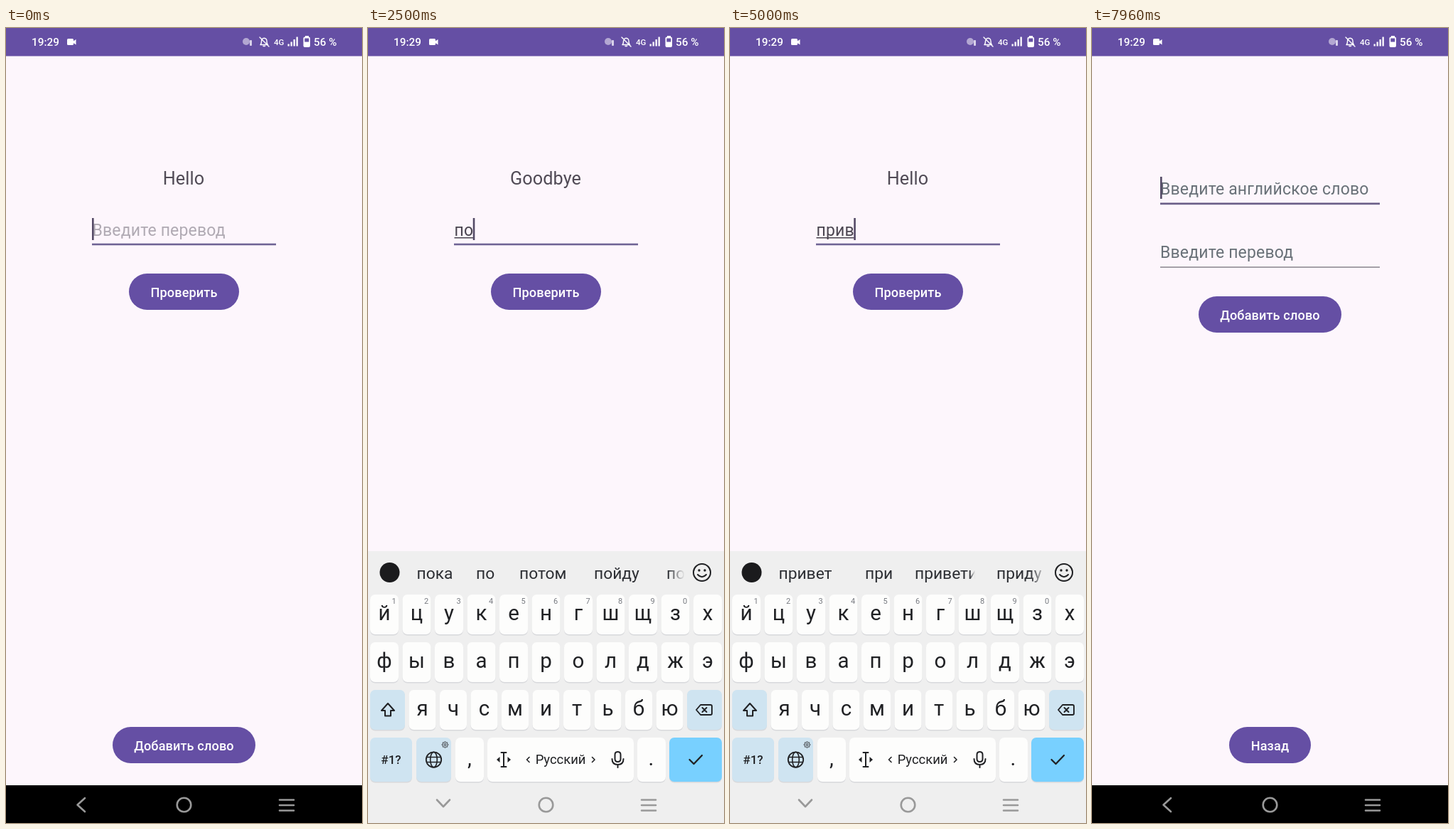
These frames come from a looping animation (501x1117 px, 8 s). An HTML page:

```html
<!DOCTYPE html>
<html lang="ru">
<head>
<meta charset="utf-8">
<title>Проверка слов</title>
<style>
html, body { margin: 0; width: 100%; height: 100%; overflow: hidden; background: #fdf6fc; }
svg { display: block; width: 100%; height: 100%; font-family: Roboto, "Noto Sans", sans-serif; }
text { white-space: pre; }
.mid { text-anchor: middle; }
.line { fill: none; stroke-linecap: round; stroke-linejoin: round; }
.word { font-size: 25.2px; letter-spacing: .005em; fill: #504a55; }
.field { font-size: 23px; letter-spacing: .007em; }
.btn { font-size: 18.1px; font-weight: 500; letter-spacing: .007em; fill: #fff; }
.status { font-size: 15.3px; font-weight: 500; fill: #fff; }
.key { font-size: 29.5px; fill: #202124; }
.num { font-size: 11px; fill: #777a80; }
.sug { font-size: 22.8px; fill: #2c2e33; }
</style>
</head>
<body>
<svg viewBox="0 0 501 1117" preserveAspectRatio="none">
  <defs>
    <radialGradient id="glow">
      <stop offset="0" stop-color="#fff" stop-opacity=".25"/>
      <stop offset=".6" stop-color="#fff" stop-opacity=".22"/>
      <stop offset="1" stop-color="#fff" stop-opacity="0"/>
    </radialGradient>
    <linearGradient id="fade">
      <stop offset="0" stop-color="#efefef" stop-opacity="0"/>
      <stop offset="1" stop-color="#efefef"/>
    </linearGradient>
    <clipPath id="checkClip"><rect x="173" y="345" width="155" height="51" rx="25.5"/></clipPath>
    <clipPath id="addClip"><rect x="150" y="982" width="201" height="51" rx="25.5"/></clipPath>
  </defs>
  <rect width="501" height="1117" fill="#fdf6fc"/>
  <g id="quiz"></g>
  <g id="form"></g>
  <g id="bar"></g>
  <rect y="1064" width="501" height="53"/>
  <g id="board"></g>
  <g id="nav" class="line" stroke="#999" stroke-width="2.6"></g>
</svg>
<script>
const LOOP = 8000;
const PURPLE = '#654fa4', INK = '#202124', BOARD = '#efefef', BLUE = '#cfe4f1', SKIN = '#fcc02e';
const $ = id => document.getElementById(id);

const rect = (x, y, w, h, fill, rx = 0) =>
  `<rect x="${x}" y="${y}" width="${w}" height="${h}" rx="${rx}" fill="${fill}"/>`;
const text = (x, y, s, cls, more = '') => `<text x="${x}" y="${y}" class="${cls}" ${more}>${s}</text>`;
const line = (d, stroke = INK, width = 2) =>
  `<path class="line" d="${d}" stroke="${stroke}" stroke-width="${width}"/>`;
const ring = (x, y, r, width = 2, stroke = INK) =>
  `<circle cx="${x}" cy="${y}" r="${r}" fill="none" stroke="${stroke}" stroke-width="${width}"/>`;
const dot = (x, y, r, fill = INK) => `<circle cx="${x}" cy="${y}" r="${r}" fill="${fill}"/>`;
const button = (x, y, w, label, inner = '') =>
  rect(x, y, w, 51, PURPLE, 25.5) + inner + text(250.5, y + 32.5, label, 'btn mid');
const ripple = (id, x, y, clip) =>
  `<g clip-path="url(#${clip})"><circle id="${id}" cx="${x}" cy="${y}" r="0" fill="url(#glow)"/></g>`;

// Status bar
$('bar').innerHTML = rect(0, 0, 501, 39.5, PURPLE)
  + text(36, 25, '19:29', 'status')
  + rect(86, 15, 9, 9, '#fff', 1.5) + '<path d="M94 19l4.5-3v7.5l-4.5-3z" fill="#fff"/>'
  + dot(338, 19, 5, '#b3a7d2') + rect(343, 17, 3, 8, '#d9d2ea', 1)
  + line('M358 23.5h10.5q-1.5-1-1.5-5q0-4-3.7-4.3q-3.8.3-3.8 4.3q0 4-1.5 5M362 25.5h2.5M357 13l13 13', '#fff', 1.4)
  + text(377, 23.5, '4G', 'status', 'style="font-size:11.5px"')
  + '<g id="bang">' + rect(396.5, 15, 2, 5, '#fff') + '</g>'
  + [3, 6, 9.5, 13].map((h, i) => rect(396.5 + i * 4, 25.5 - h, 2.3, h, '#fff')).join('')
  + rect(421, 11, 5, 3, '#fff') + rect(418.5, 12.5, 9.5, 14.5, '#fff', 2) + rect(420.3, 14.5, 6, 5, PURPLE)
  + text(433, 25, '56 %', 'status');

// Quiz screen
$('quiz').innerHTML = text(250, 220, '', 'word mid', 'id="word"')
  + text(121.5, 292, 'Введите перевод', 'field', 'id="hint" fill="#b0aab3"')
  + text(121.5, 292, '', 'field', 'id="typed" fill="#4a4550"')
  + '<rect id="compose" x="121.5" y="294" height="1.5" fill="#4a4550"/>'
  + rect(121, 302.7, 259, 2.6, '#6f6394')
  + '<rect id="cursor" y="267" width="2.6" height="31" fill="#544a66"/>'
  + button(173, 345, 155, 'Проверить', ripple('checkRipple', 210, 371, 'checkClip'))
  + button(150, 982, 201, 'Добавить слово', ripple('addRipple', 250, 1008, 'addClip'));

// New word screen
$('form').innerHTML = text(96, 234, 'Введите английское слово', 'field', 'fill="#697178"')
  + rect(96, 245.5, 309, 2.7, '#6a5f88')
  + '<rect id="formCursor" x="96" y="209" width="2.6" height="31" fill="#544a66"/>'
  + text(96, 323, 'Введите перевод', 'field', 'fill="#697178"')
  + rect(96, 335.3, 309, 1.5, '#89858d')
  + button(150, 377, 201, 'Добавить слово')
  + button(193, 982, 115, 'Назад');

// Keyboard
const cap = (x, y, w, h, fill = '#fdfdfc') => rect(x, y + 1.5, w, h, '#d8d9dc', 7) + rect(x, y, w, h, fill, 7);
const keyRow = (letters, x, pitch, w, y) => [...letters].map((c, i) =>
  cap(x + i * pitch - w / 2, y, w, 56) + text(x + i * pitch, y + 36, c, 'key mid')).join('');
const cog = (x, y, r, teeth, width, color = INK) => {
  let d = '';
  for (let i = 0; i < teeth * 4; i++) {
    const a = (i - .5) * Math.PI / teeth / 2, k = i % 4 < 2 ? r : r * .76;
    d += (i ? 'L' : 'M') + (x + k * Math.cos(a)).toFixed(1) + ' ' + (y + k * Math.sin(a)).toFixed(1);
  }
  return line(d + 'Z', color, width) + ring(x, y, r * .32, width, color);
};
const tools = line('M110 754h17q1 0 1 1v20q0 1-1 1h-17q-1 0-1-1v-20q0-1 1-1M114 761h9M114 766h9M114 771h6')
  + rect(113.5, 751, 10, 5, INK, 1.5)
  + ring(206, 765, 12) + '<path d="M200 754.5a12 12 0 0 0 6 22.5q5-6 2-12t-8-10.5z" fill="#202124"/>'
  + text(198.5, 771, 'A', '', 'font-size="12" font-weight="700" fill="#fff"')
  + line('M209 761h6M212 759v2M214 761q-1 5-5 7M210 763q2 4 5 5', INK, 1.5)
  + ring(291.5, 762.5, 9) + line('M298 769l8 8')
  + cog(382, 765, 13.5, 6, 2);
const digits = [...'1234567890'].map((n, i) => text(36.5 + i * 45.5, 809, n, 'num mid')).join('');

$('board').innerHTML = rect(0, 735, 501, 382, BOARD)
  + dot(30.5, 765, 14, '#1b1b1d')
  + `<g id="tools">${tools}</g><g id="sugs"></g>`
  + ring(470, 765, 12) + dot(466, 762, 1.7) + dot(474, 762, 1.7) + line('M464 768q6 6.5 12 0')
  + keyRow('йцукенгшщзх', 23, 45.5, 40, 796) + digits
  + keyRow('фывапролджэ', 23, 45.5, 40, 863)
  + cap(3, 930, 49, 56, BLUE) + keyRow('ячсмитьбю', 76.5, 43.5, 38, 930) + cap(449, 930, 49, 56, BLUE)
  + line('M28 949l9 10h-5v7.5h-8v-7.5h-5z')
  + line('M468 951h14q2 0 2 2v10q0 2-2 2h-14l-6-7zM470.5 955l6 6M476.5 955l-6 6', INK, 1.9)
  + cap(3, 997, 59, 62, BLUE) + text(32.5, 1033.5, '#1?', 'mid', 'font-size="17" font-weight="500" fill="#202124"')
  + cap(68, 997, 49, 62, BLUE) + ring(92.5, 1028, 10.7, 1.8)
  + '<ellipse cx="92.5" cy="1028" rx="4.8" ry="10.7" fill="none" stroke="#202124" stroke-width="1.6"/>'
  + line('M83 1024.5h19M83 1031.5h19', INK, 1.5) + cog(108.5, 1007, 4.3, 8, 1.1, '#5c6268')
  + cap(123, 997, 40, 62) + text(143, 1036, ',', 'key mid')
  + cap(168, 997, 206, 62)
  + line('M187.5 1018h7M191 1018v20M187.5 1038h7')
  + '<path d="M185.5 1024v8l-4.5-4zM196.5 1024v8l4.5-4z" fill="#202124"/>'
  + line('M227 1024.5l-3.5 3.5l3.5 3.5M315.5 1024.5l3.5 3.5l-3.5 3.5', INK, 1.6)
  + text(271, 1034, 'Русский', 'mid', 'font-size="18.4" fill="#202124"')
  + line('M351.5 1017q4 0 4 4v6q0 4-4 4t-4-4v-6q0-4 4-4M343.5 1027q0 8 8 8t8-8M351.5 1035v4')
  + cap(379, 997, 40, 62) + text(398.5, 1036, '.', 'key mid')
  + cap(424, 997, 74, 62, '#78d0ff') + line('M452.5 1028l6 6l11.5-12', INK, 2.3);

$('nav').innerHTML = '<path id="back" d="M111 1082l-10.5 9.5l10.5 9.5"/>'
  + '<path id="down" d="M97 1084.5l9 9.5l9-9.5"/>'
  + '<circle cx="250.5" cy="1091.5" r="9.8"/><path d="M385 1084.5h20M385 1092h20M385 1099.5h20"/>';

// Suggestions: x, word, optional right edge where the word is cut
const SUGS = {
  p: [[68.5, 'привет'], [190, 'понял', 234], [265, 'про', 302], [332, 'по'], [397, 'почему']],
  po: [[68.5, 'пока'], [152, 'по'], [213, 'потом'], [318, 'пойду'], [420, 'поч']],
  pr: [[68.5, 'привет'], [190, 'при'], [260, 'приветик', 345], [375, 'приду']],
  s: [[68.5, 'спасибо'], [190, 'сейчас', 250], [280, 'с'], [325, 'сегодня', 390], [415, 'со']],
  hi: [[68, 'как'], [150.5, 'wave'], [195, 'ты'], [255, 'да'], [312, 'не'], [369, 'нет'], [438, 'но']],
  thanks: [[68, 'большое'], [206, 'pray'], [252, 'за'], [306, 'что'], [374, 'тебе']]
};
const EMOJI = {
  wave: x => `<g transform="translate(${x} 766) rotate(-35)">`
    + line('M-5 3l-1.5-9M-1.5 2v-12M2.5 2l1-11M6 4l2.5-8', SKIN, 3.3)
    + line('M-5 8l-5-5', SKIN, 3.6)
    + `<ellipse cx=".8" cy="5" rx="7.5" ry="6.5" fill="${SKIN}"/>`
    + line('M-3.2 2v-6M.6 2v-7M4.4 2l.8-5', '#e59a1c', .8) + '</g>',
  pray: x => `<g transform="translate(${x} 766)"><path d="M-1-13q-3 0-3 4l-1 8l-5 7l5 5l5-6zM1-13q3 0 3 4l1 8l5 7l-5 5l-5-6z" fill="${SKIN}"/>`
    + '<path d="M0-12v16" stroke="#e59a1c"/><path d="M-10 3l7 6l-3 4h-7v-6zM10 3l-7 6l3 4h7v-6z" fill="#42a5f5"/></g>'
};
const drawSugs = name => SUGS[name].map(([x, s, cut]) =>
  EMOJI[s] ? EMOJI[s](x) : text(x, 774, s, 'sug')
    + (cut ? rect(cut - 8, 745, 8, 42, 'url(#fade)') + rect(cut, 745, 30, 42, BOARD) : '')
).join('') + rect(422, 745, 24, 42, 'url(#fade)') + rect(445, 745, 56, 42, BOARD);

// Time, word, typed text, suggestions
const STEPS = [
  [0, 'Hello', ''], [430, 'Hello', 'п', 'p'], [850, 'Hello', 'привет ', 'hi'],
  [1640, 'Goodbye', '', 'hi'], [2050, 'Goodbye', 'п', 'p'], [2320, 'Goodbye', 'по', 'po'],
  [2580, 'Goodbye', 'пок', 'po'], [2840, 'Goodbye', 'пока', 'po'],
  [3310, 'Thank you', ''], [3620, 'Thank you', 'с', 's'], [3880, 'Thank you', 'спасибо ', 'thanks'],
  [4230, 'Hello', '', 'thanks'],
  ...[1, 2, 3, 4, 5, 6].map(n => [4360 + n * 160, 'Hello', 'привет'.slice(0, n), n > 1 ? 'pr' : 'p']),
  [5690, 'Goodbye', '']
];

const TAPS = [1590, 3260, 4210, 5650], ADD_TAP = 6720, FORM_AT = 6900;
const clamp = v => Math.max(0, Math.min(1, v));
const ease = v => 1 - (1 - clamp(v)) ** 3;
const blink = dt => dt % 1000 < 500 ? 1 : 0;
const set = (id, name, v) => $(id).setAttribute(name, v);
const show = (id, on) => set(id, 'display', on ? 'inline' : 'none');

function setRipple(id, dt) {
  const live = dt >= 0 && dt < 500;
  set(id, 'r', live ? Math.min(250, 6 + dt * 1.03) : 0);
  set(id, 'opacity', 1 - clamp((dt - 240) / 240));
}

let shown = null;
function render(t) {
  const step = STEPS.filter(s => s[0] <= t).pop();
  const [at, word, typed, sugs] = step;
  if (step !== shown) {
    shown = step;
    $('word').textContent = word;
    $('typed').textContent = typed;
    $('sugs').innerHTML = sugs ? drawSugs(sugs) : '';
    show('tools', !sugs);
    show('hint', !typed);
  }
  const width = typed ? $('typed').getComputedTextLength() : 0;
  set('compose', 'width', typed.endsWith(' ') ? 0 : width);
  set('cursor', 'x', 121 + width);
  set('cursor', 'opacity', blink(t - at));
  set('formCursor', 'opacity', blink(t - FORM_AT));

  const open = ease((t - 110) / 240) * (1 - ease((t - 6080) / 240));
  set('board', 'transform', `translate(0 ${382 * (1 - open)})`);
  show('board', open > 0);
  show('back', open <= .5);
  show('down', open > .5);

  setRipple('checkRipple', t - (TAPS.filter(v => v <= t).pop() ?? LOOP));
  setRipple('addRipple', t - ADD_TAP);

  const swap = ease((t - FORM_AT) / 220);
  set('quiz', 'opacity', 1 - swap);
  set('form', 'opacity', swap);
  show('bang', t >= 1500 && t < 2500 || t >= 4140 && t < 4930);
}

const start = performance.now();
function tick() {
  render((performance.now() - start) % LOOP);
  requestAnimationFrame(tick);
}
render(0);
requestAnimationFrame(tick);
</script>
</body>
</html>
```
